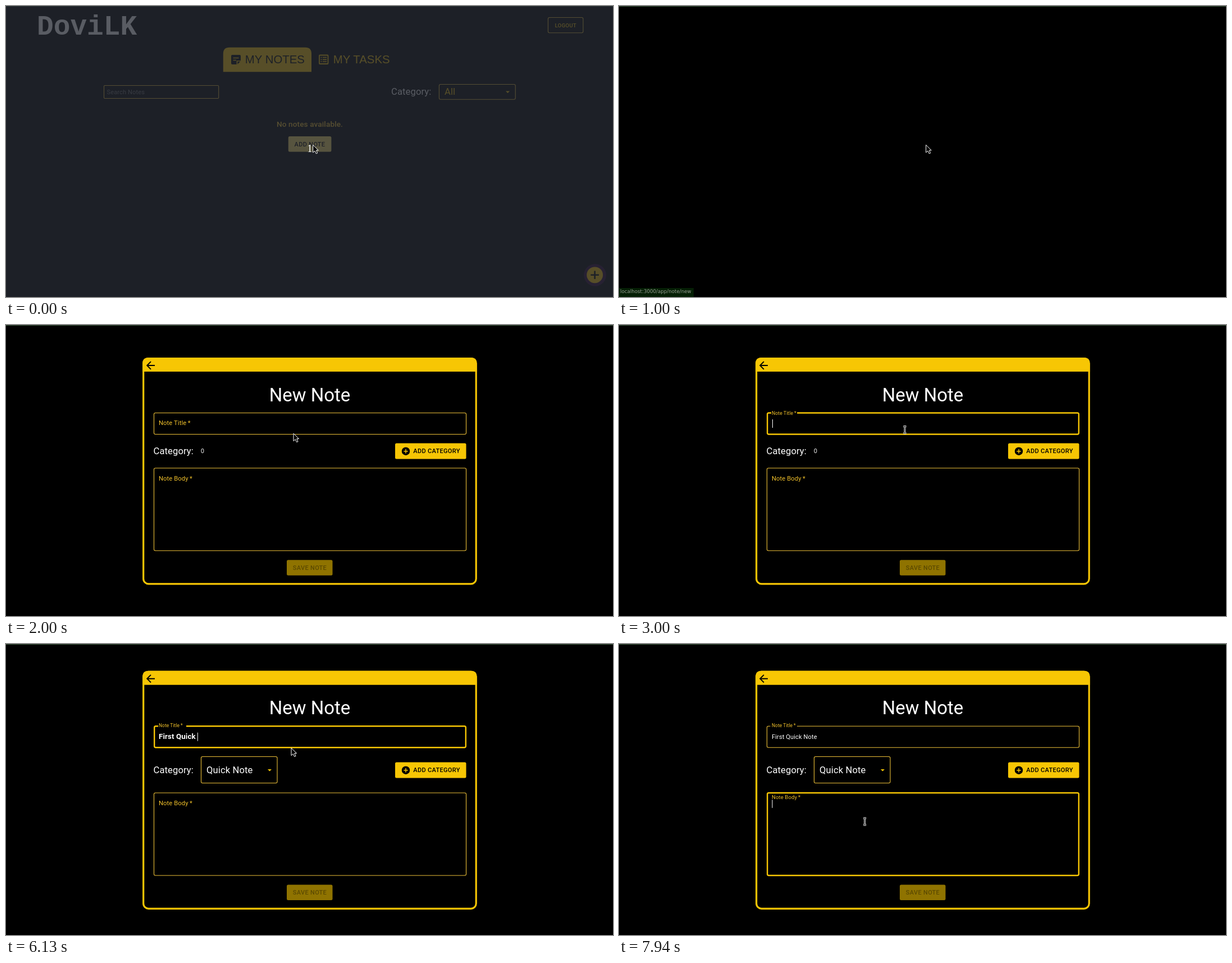
Recreate the animation shown at these times as an HTML page. Size 1081 by 518 pixels, loop 8 s.

```html
<!DOCTYPE html>
<html lang="en">
<head>
<meta charset="utf-8">
<title>Notes app</title>
<style>
  html, body { margin: 0; width: 100%; height: 100%; overflow: hidden; background: #000; }
  svg { display: block; font: 11.1px Roboto, sans-serif; letter-spacing: .0094em; fill: #fff; }
  text { white-space: pre; }
  .gold { fill: #f7c604; }
  .label { fill: #f0c02a; }
  .dark { fill: #000; }
  .big { font-size: 16.6px; }
  .btn { font-size: 11px; font-weight: 500; letter-spacing: .0286em; text-anchor: middle; }
  .tab { font: 20.4px "Liberation Sans", Arial, sans-serif; letter-spacing: 0; }
  .mid { text-anchor: middle; }
  .box { fill: none; stroke: #ecbf38; stroke-width: 1.1; }
  .hover { stroke: #f7c604; }
  .focus { stroke: #f7c604; stroke-width: 2.4; x: 264.2px; width: 554.6px; }
  .line { fill: none; stroke: #f7c604; }
  .ink { fill: none; stroke: #000; }
  .editing { font-size: 13.3px; font-weight: 700; }
</style>
</head>
<body>
<svg width="1081" height="518" viewBox="0 0 1081 518">
  <rect class="dark" width="1081" height="518"/>

  <g id="home">
    <text x="55" y="51" style="font:700 49.5px 'Liberation Mono',monospace;letter-spacing:0">DoviLK</text>
    <rect class="box" x="965.4" y="20.5" width="62.4" height="27.2" rx="2.5"/>
    <text class="btn gold" x="996.6" y="37.5" style="font-size:9.6px">LOGOUT</text>

    <path class="gold" d="M386.800 117.300V85q0-11.300 11-11.300H533q11 0 11 11.300V117.300Z"/>
    <path class="dark" d="M403 87H416q2 0 2 2V98L412 104H403q-2 0-2-2V89q0-2 2-2Z"/>
    <path class="line" stroke-width="1.7" d="M404.5 92.5H414.5M404.5 96.5H410M411.5 104V98H418"/>
    <text class="tab dark" x="425.8" y="101.8">MY NOTES</text>
    <rect class="line" x="558" y="87.5" width="15.5" height="15.5" rx="1" stroke-width="1.8"/>
    <path class="line" stroke-width="1.7" d="M560.5 91.5h2m1.500 0h7M560.5 95.300h2m1.500 0h7M560.5 99h2m1.500 0h7"/>
    <text class="tab gold" x="582.8" y="101.8">MY TASKS</text>

    <rect class="box" x="174.5" y="141.5" width="204.2" height="23" rx="1.5"/>
    <text x="179.500" y="157" fill="#707070">Search Notes</text>
    <text class="big" x="686" y="158">Category:</text>
    <rect class="box" x="771.4" y="139.5" width="135.800" height="26.700" rx="2.5"/>
    <text class="big gold" x="781" y="158">All</text>
    <path class="gold" d="M890 151.500h7l-3.500 3.500Z"/>

    <text class="mid label" x="541" y="214.500" style="font-size:13.6px;font-weight:500;letter-spacing:.0075em">No notes available.</text>
    <rect x="502.800" y="232" width="76.600" height="27.400" rx="2.5" fill="#f9dc68"/>
    <text class="btn dark" x="541" y="249.5">ADD NOTE</text>

    <circle cx="1049" cy="479" r="19.800" fill="#2a0633"/>
    <circle class="gold" cx="1048.600" cy="478.800" r="14.400"/>
    <path class="ink" stroke-width="2.600" d="M1041.300 478.800h14.600M1048.600 471.500v14.600"/>
  </g>

  <g id="form">
    <rect class="line" id="frame" x="244.700" width="592.500" rx="9" stroke-width="3.200"/>
    <g id="upper">
      <path class="gold" d="M243.200 83V68q0-10 10-10H828.500q10 0 10 10V83Z"/>
      <path class="ink" stroke-width="1.900" d="M265 72H251.500M258 65.200L251.200 72L258 78.800"/>
      <text class="mid" x="541" y="135.500" style="font-size:33px;letter-spacing:0">New Note</text>
      <rect class="box" id="titleBox" x="263.5" y="156.500" width="556" height="38" rx="2.5"/>
      <rect class="dark" id="notch" y="153" height="6"/>
      <text class="label" id="titleLabel" x="272">Note Title&#8201;*</text>
      <text id="title" x="272"></text>
      <rect id="titleCaret" y="168" width="1" height="15"/>
    </g>
    <text class="big" x="262.500" y="230">Category:</text>
    <text id="zero" x="347" y="228" style="font:10.5px 'Liberation Sans',sans-serif">0</text>
    <g id="select">
      <rect class="box" x="347.500" y="200.500" width="135.500" height="47" rx="2.500"/>
      <text class="big" x="357" y="230">Quick Note</text>
      <path class="gold" d="M466 223h7l-3.500 3.500Z"/>
    </g>
    <rect class="gold" x="693" y="210.500" width="126.500" height="28" rx="2.500"/>
    <circle class="dark" cx="712" cy="224.700" r="7.200"/>
    <path class="line" stroke-width="1.500" d="M708.300 224.700h7.400M712 221v7.400"/>
    <text class="btn dark" x="767" y="228.300">ADD CATEGORY</text>
    <g id="lower">
      <rect class="box" id="bodyBox" x="263.5" y="254.700" width="556" height="147" rx="2.5"/>
      <text class="label" id="bodyLabel" x="272">Note Body&#8201;*</text>
      <rect id="bodyCaret" x="272.500" y="267" width="1" height="14.500"/>
      <rect x="500" y="418.300" width="81.500" height="27.500" rx="2.500" fill="#8f7300"/>
      <text class="btn" x="541" y="436" fill="#5c4a00">SAVE NOTE</text>
    </g>
  </g>

  <g id="status">
    <rect y="502" width="133" height="16" fill="#051f05"/>
    <text x="2" y="511" fill="#97a092" style="font:8.7px 'DejaVu Sans',sans-serif;letter-spacing:0">localhost:3000/app/note/new</text>
  </g>
  <rect width="1081" height="1" fill="#3f5c40"/>

  <g id="countdown">
    <rect width="1081" height="518" fill="#272b33" opacity=".765"/>
    <text x="536.500" y="260" style="font:18px 'Liberation Serif',serif">1</text>
  </g>

  <g id="pointer">
    <path id="arrow" class="dark" stroke="#fff" d="M0 0V13.500L3.300 10.600L5.600 15.500L8 14.500L5.800 9.600H9.600Z"/>
    <path id="hand" class="dark" stroke="#fff" stroke-width=".8" transform="translate(-.7 -.5) scale(1.05)" d="M2.500 1.200a1 1 0 0 1 2 0V5.500L8 6.400Q9.600 7 9.400 9L8.600 13H3.500L.3 8.600Q0 7 1.400 7.200L2.500 8Z"/>
    <g id="beam" fill="none">
      <path stroke="#fff" stroke-width="2.800" d="M-2.500-6H2.500M0-6V6M-2.500 6H2.500"/>
      <path stroke="#000" d="M-2.500-6H2.500M0-6V6M-2.500 6H2.500"/>
    </g>
  </g>
</svg>
<script>
const $ = id => document.getElementById(id);
const set = (id, attrs) => { for (const k in attrs) $(id).setAttribute(k, attrs[k]); };
const show = (id, on) => set(id, { visibility: on ? 'visible' : 'hidden' });
const move = (id, x, y) => set(id, { transform: `translate(${x} ${y})` });
const progress = (t, start, length) => Math.min(1, Math.max(0, (t - start) / length));
const easeOut = (p, power) => 1 - (1 - p) ** power;

const LOOP = 8000, TICK = 62.5;
const phrase = 'First Quick Note';
// [time, characters typed]
const typing = [[3940, 1], [4130, 2], [4380, 3], [4500, 4], [4560, 5], [4690, 6], [5380, 7], [5560, 8],
  [5750, 9], [5880, 11], [6130, 12], [6310, 13], [6630, 14], [6880, 16]];

// Floating field label: p = 0 resting inside the box, p = 1 shrunk onto its border.
function floatLabel(id, baseline, p) {
  $(id).style.fontSize = 11.2 * (1 - p / 4) + 'px';
  set(id, { y: baseline - 19.5 * p });
}

function drawHome(t) {
  show('countdown', t < 60);
  set('home', { opacity: 1 - easeOut(progress(t, 690, 300), 1.66) });
  show('status', t >= 130 && t < 1380);
  set('status', { opacity: 1 - .6 * progress(t, 1250, 60) });
}

function drawForm(t) {
  const grow = t >= 5190 ? 10.3 : 0;
  const focusTitle = t >= 2940 && t < 7940, focusBody = t >= 7940;
  set('form', { display: t >= 1190 ? 'inline' : 'none' });
  move('form', 0, -518 * (1 - easeOut(progress(t, 1135, 300), 1.66)));
  set('frame', { y: 59.6 - grow, height: 401.2 + 2 * grow });
  move('upper', 0, -grow);
  move('lower', 0, grow);
  set('zero', { display: grow ? 'none' : 'inline' });
  set('select', { display: grow ? 'inline' : 'none' });

  const hoverTitle = t >= 2060 && t < 2940, hoverBody = t >= 7500 && t < 7940;
  set('titleBox', { class: 'box' + (focusTitle ? ' focus' : hoverTitle ? ' hover' : '') });
  set('bodyBox', { class: 'box' + (focusBody ? ' focus' : hoverBody ? ' hover' : '') });

  const lift = easeOut(progress(t, 2890, 200), 3);
  floatLabel('titleLabel', 178.3, lift);
  floatLabel('bodyLabel', 276.6, easeOut(progress(t, 7892, 200), 3));
  set('notch', { x: focusTitle ? 271 : 269.5, width: (focusTitle ? 50 : 47.5) * lift });

  const typed = typing.reduce((n, [at, count]) => t >= at ? count : n, 0);
  const caretOn = t >= 3000 && t < 3690 || t >= 3940 && t < 7440;
  const title = $('title');
  title.textContent = phrase.slice(0, typed);
  set('title', { class: focusTitle ? 'editing' : '', y: focusTitle ? 179.8 : 179 });
  set('titleCaret', {
    x: typed ? 271.7 + title.getComputedTextLength() : 273,
    display: caretOn ? 'inline' : 'none'
  });
  set('bodyCaret', { display: focusBody ? 'inline' : 'none' });
}

function drawPointer(t) {
  let x = 546.7, y = 247.3;
  if (t >= 2000) {
    const p = easeOut(progress(t, 2005, 490), 2);
    x = 512 - 3 * p;
    y = 193 - 6.5 * p;
  }
  if (t >= 5250) [x, y] = [508, 185];
  if (t >= 7440) {
    const p = easeOut(progress(t, 7390, 300), 1.66);
    x = 508 - 70.3 * p;
    y = 185 + 131 * p;
  }
  const beam = t >= 2060 && t < 5250 || t >= 7440 && y > 265;
  const hand = t >= 60 && t < 880;
  move('pointer', x, y);
  show('beam', beam);
  show('hand', hand);
  show('arrow', !beam && !hand);
}

function frame(now) {
  // The screen refreshes 16 times a second.
  const t = Math.floor((now % LOOP + 5) / TICK) * TICK % LOOP + 5;
  drawHome(t);
  drawForm(t);
  drawPointer(t);
  requestAnimationFrame(() => frame(performance.now()));
}
frame(performance.now());
</script>
</body>
</html>
```
